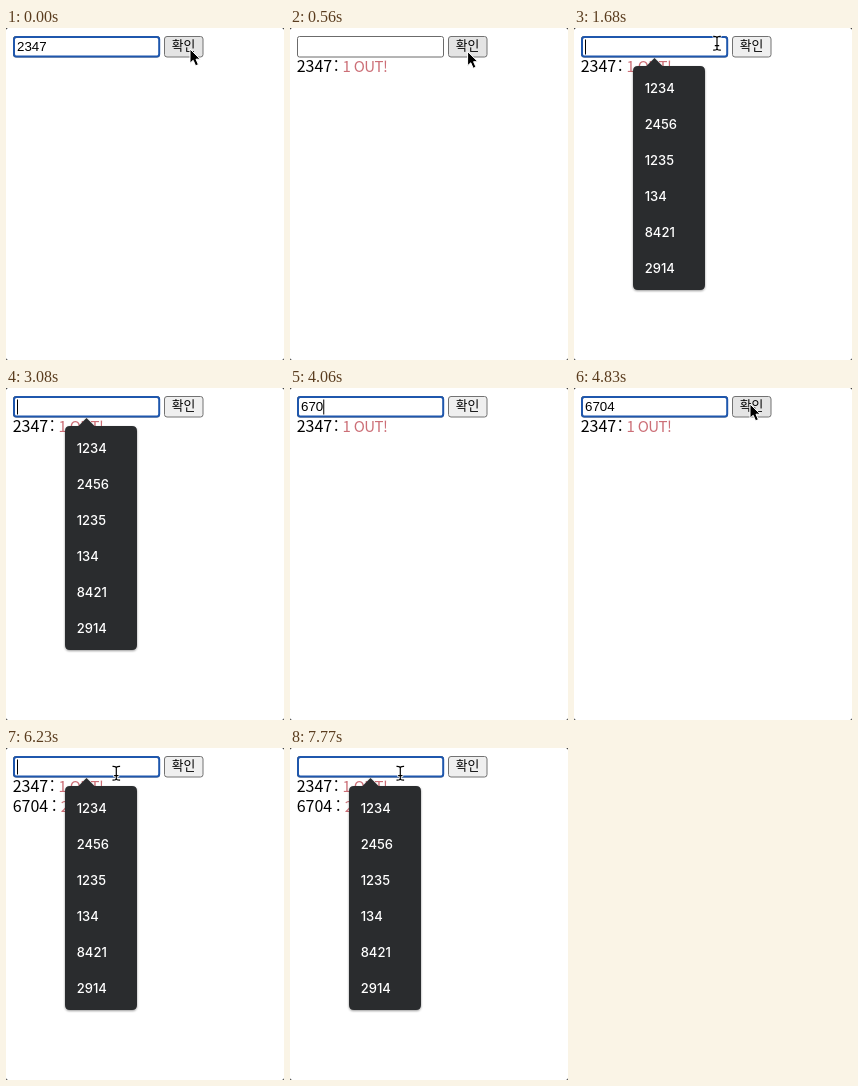
Write an HTML page that moves like this. It is 278 by 332 pixels and loops after 8000 ms.

```html
<!DOCTYPE html>
<html lang="ko">
<head>
<meta charset="utf-8">
<title>Number game</title>
<style>
html, body { margin: 0; width: 100%; height: 100%; overflow: hidden; background: #fff; }
svg { display: block; width: 278px; height: 332px; }
text { white-space: pre; }
.field { font: 13.333px "Liberation Sans", Arial, sans-serif; }
.button { font: 500 12.8px "Noto Sans CJK KR", "Noto Sans CJK", sans-serif; text-anchor: middle; }
.log { font: 500 16px "Noto Sans CJK KR", "Noto Sans CJK", sans-serif; }
.out { font-size: 15px; font-weight: 400; fill: #cc6f77; letter-spacing: -.6px; }
.menu { font: 500 13px Inter, sans-serif; fill: #fff; }
</style>
</head>
<body>
<svg viewBox="0 0 278 332">
  <defs>
    <filter id="shadow" x="-20%" y="-10%" width="140%" height="120%" color-interpolation-filters="sRGB">
      <feDropShadow dx="0" dy="1" stdDeviation="1" flood-opacity=".4"/>
    </filter>
    <path id="beamShape" d="M-3.2-6.7Q-.2-6.7 0-5Q.2-6.7 3.2-6.7M0-5V5.5M-3.2 7.2Q-.2 7.2 0 5.5Q.2 7.2 3.2 7.2M-1.6 2.6H1.6"/>
  </defs>
  <rect width="278" height="332" fill="#fff"/>
  <path d="M0 0h2.5Q0 0 0 2.5zM278 0h-2.5Q278 0 278 2.5zM0 332h2.5Q0 332 0 329.5zM278 332h-2.5Q278 332 278 329.5z" fill="#222"/>

  <rect id="plain" x="7.5" y="8.5" width="146" height="20.5" rx="2" fill="#fff" stroke="#6b6b6b"/>
  <rect id="ring" x="8" y="9" width="145.2" height="19.6" rx="2.5" fill="#fff" stroke="#1f57ad" stroke-width="2"/>
  <text id="value" class="field" x="11" y="23"></text>
  <rect id="caret" y="11.5" width="1" height="15" fill="#000"/>

  <rect id="button" x="158.5" y="8.5" width="38.5" height="20.5" rx="2.5" stroke="#727272"/>
  <text class="button" x="177.6" y="22.2">확인</text>

  <g class="log">
    <g id="first"><text x="6.7" y="44">2347</text><text x="44" y="44">:</text><text class="out" x="52.5" y="44">1 OUT!</text></g>
    <g id="second"><text x="6.7" y="63.5">6704</text><text x="46" y="63.5">:</text><text class="out" x="54.8" y="63.5">2 OUT!</text></g>
  </g>

  <g id="menu" class="menu">
    <path filter="url(#shadow)" fill="#2a2c2e" d="M64 38h8.5l8-8 8 8H126q5 0 5 5v214q0 5-5 5H64q-5 0-5-5V43q0-5 5-5z"/>
  </g>

  <path id="arrow" d="M0 0V14.2L3.2 11.3L5.6 16.8L8.4 15.6L6 10.2H10.3Z" fill="#000" stroke="#fff" stroke-linejoin="round"/>
  <g id="beam" fill="none" stroke-linecap="square">
    <use href="#beamShape" stroke="#fff" stroke-width="2.6"/>
    <use href="#beamShape" stroke="#000" stroke-width="1.2"/>
  </g>
</svg>
<script>
const LOOP = 8000, STEP = 70;
const el = id => document.getElementById(id);

// Pointer path: time, x, y
const path = [
  [0, 184, 21], [140, 184, 21], [210, 185, 24], [490, 185, 24], [1050, 125.7, 20],
  [1470, 125.7, 20], [1610, 138, 12], [1750, 148, 18], [4200, 148, 18],
  [4550, 177, 13], [4620, 177, 13], [4830, 176, 16], [5250, 176, 16],
  [5600, 137, 22.5], [5740, 128, 25], [5880, 128, 25], [6230, 110.3, 25], [LOOP, 110.3, 25]
];
// Field contents: start time, text
const typing = [[0, "2347"], [70, ""], [3150, "6"], [3290, "67"], [3640, "670"], [4130, "6704"], [5180, ""]];
// Visible spans: start, end
const spans = {
  ring: [[0, 140], [1610, 5250], [6090, LOOP]],
  caret: [[1610, 2170], [2730, 4690], [6090, 6720], [7210, 7770]],
  menu: [[1680, 3150], [6160, LOOP]],
  first: [[70, LOOP]],
  second: [[5180, LOOP]]
};
const hidden = [[3010, 4270]];

["1234", "2456", "1235", "134", "8421", "2914"].forEach((label, i) => {
  const t = document.createElementNS("http://www.w3.org/2000/svg", "text");
  t.setAttribute("x", 70.7);
  t.setAttribute("y", 65 + 36 * i);
  t.textContent = label;
  el("menu").append(t);
});

const within = (list, t) => list.some(([a, b]) => t >= a && t < b);
const show = (id, on) => el(id).setAttribute("visibility", on ? "visible" : "hidden");

function pointer(t) {
  const i = path.findIndex(p => p[0] > t);
  const [t0, x0, y0] = path[i - 1], [t1, x1, y1] = path[i];
  const k = (t - t0) / (t1 - t0);
  return [x0 + (x1 - x0) * k, y0 + (y1 - y0) * k];
}

function draw(now) {
  const t = Math.floor((now % LOOP) / STEP) * STEP;
  for (const id in spans) show(id, within(spans[id], t));

  const text = typing.filter(s => s[0] <= t).pop()[1];
  el("value").textContent = text;
  el("caret").setAttribute("x", 11 + 7.415 * text.length);

  const [x, y] = pointer(t);
  const inField = x > 7 && x < 154 && y > 8 && y < 30;
  const visible = !within(hidden, t);
  const hover = visible && x > 158 && x < 197 && y < 30;
  show("arrow", visible && !inField);
  show("beam", visible && inField);
  for (const id of ["arrow", "beam"]) el(id).setAttribute("transform", `translate(${x} ${y})`);
  el("button").setAttribute("fill", hover ? "#e4e4e4" : "#efefef");
}

const start = performance.now();
function tick() {
  draw(performance.now() - start);
  requestAnimationFrame(tick);
}
tick();
</script>
</body>
</html>
```
